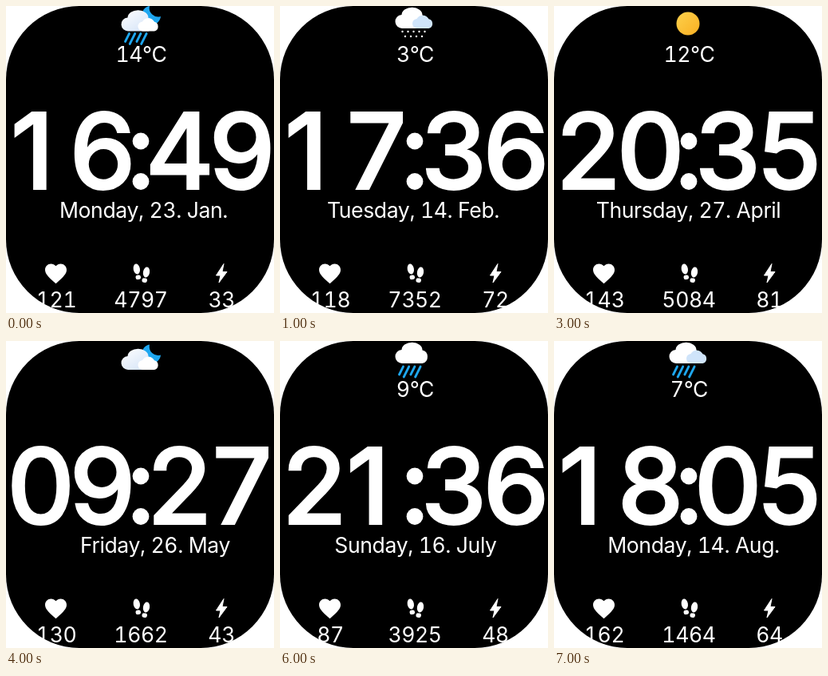
An HTML page for the animation above (8 s loop, 336 by 384 pixels).

```html
<!DOCTYPE html>
<html lang="en">
<head>
<meta charset="utf-8">
<title>Watch face</title>
<style>
html, body { margin: 0; width: 100%; height: 100%; overflow: hidden; background: #fff; }
svg { display: block; width: 336px; height: 384px; }
text { font: 26.6px Inter, sans-serif; font-variant-numeric: tabular-nums; letter-spacing: -.4px; fill: #fff; text-anchor: middle; }
.time text { font: 500 132px Inter, sans-serif; letter-spacing: 0; text-anchor: start; stroke: #fff; stroke-width: 2; }
.face { visibility: hidden; animation: show 8s step-end infinite; }
@keyframes show {
  0% { visibility: visible; }
  12.5%, 100% { visibility: hidden; }
}
.rain { stroke: #1ea7f0; stroke-width: 2.8; stroke-linecap: round; }
</style>
</head>
<body>
<svg viewBox="0 0 336 384">
  <defs>
    <linearGradient id="gold" x2="1" y2="1">
      <stop offset="0" stop-color="#fdd14c"/><stop offset="1" stop-color="#f9af22"/>
    </linearGradient>
    <linearGradient id="mist" x2="1" y2="1">
      <stop offset="0" stop-color="#fff"/><stop offset="1" stop-color="#cfe0f6"/>
    </linearGradient>
    <path id="big" d="M153.500 28A8.500 8.500 0 0 1 152.500 11A13 9.500 0 0 1 178.500 11.500A8.500 8.500 0 0 1 178.500 28Z"/>
    <path id="small" d="M172.500 28A6 6 0 0 1 171.500 16A8.500 8.500 0 0 1 186.500 16.300A6 6 0 0 1 186.500 28Z"/>
    <g id="day"><use href="#big" fill="#fff"/><use href="#small" fill="#cfe4fa"/></g>
    <g id="night">
      <path fill="#1ea7f0" d="M180 0A12 12 0 1 0 194 13A11 11 0 0 1 180 0Z"/>
      <use href="#big" fill="url(#mist)" transform="translate(0 3.500)"/>
      <use href="#small" fill="#fff" transform="translate(-.5 3.500)"/>
    </g>
  </defs>

  <rect width="336" height="384" rx="92" fill="#000"/>

  <g fill="#fff">
    <circle cx="169" cy="169" r="10.400"/>
    <circle cx="169" cy="219.500" r="10.400"/>
    <path transform="translate(46.300 318.500) scale(1.350)" d="M12 21.350l-1.450-1.320C5.400 15.360 2 12.280 2 8.500 2 5.420 4.420 3 7.500 3c1.740 0 3.410.81 4.500 2.090C13.090 3.810 14.760 3 16.500 3 19.580 3 22 5.420 22 8.500c0 3.780-3.400 6.860-8.550 11.540Z"/>
    <ellipse cx="163.800" cy="329" rx="4.100" ry="6.500" transform="rotate(-10 163.800 329)"/>
    <rect x="162.500" y="336.500" width="6.500" height="5.500" rx="2.700" transform="rotate(-10 166 339)"/>
    <ellipse cx="176" cy="333" rx="4.100" ry="6.500" transform="rotate(10 176 333)"/>
    <rect x="170.500" y="340.500" width="6.500" height="5.500" rx="2.700" transform="rotate(10 174 343)"/>
    <path d="M273 322.500L263.500 337H269L267 346L277 332.500H271Z" stroke="#fff" stroke-linejoin="round"/>
  </g>
  <g id="faces"></g>
</svg>

<script>
const use = (id, y = 0) => `<use href="#${id}" y="${y}"/>`;

const rain = (n, x, y) => '<g class="rain">' + Array.from({ length: n }, (_, i) => {
  const left = x + i * 7.2, len = i % 2 ? 13 : 10;
  return `<path d="M${left} ${y}l${-len * 0.5} ${len}"/>`;
}).join('') + '</g>';

const snow = () => Array.from({ length: 9 }, (_, i) => {
  const row = i < 5 ? 0 : 1;
  const x = row ? 157 + (i - 5) * 7 : 153.5 + i * 7;
  return `<circle cx="${x}" cy="${32 + row * 6}" r="1.2" fill="#fff"/>`;
}).join('');

const icons = {
  nightRain: use('night') + rain(4, 154.5, 34.5),
  snow: use('day') + snow(),
  storm: use('day') + '<path fill="url(#gold)" d="M164 25H171L168 31H173.500L160 42.500L163.500 34.500H158Z"/>',
  sun: '<circle cx="168" cy="22" r="14.500" fill="url(#gold)"/>',
  night: use('night', 4.5),
  shower: '<use href="#big" fill="#fff"/>' + rain(4, 154.5, 32),
  rain: use('day') + rain(4, 154.5, 32),
};

// icon, temperature, time, date, date centre, pulse, steps, energy
const faces = [
  ['nightRain', '14°C', '1649', 'Monday, 23. Jan.', 172.5, 121, 4797, 33],
  ['snow', '3°C', '1736', 'Tuesday, 14. Feb.', 167, 118, 7352, 72],
  ['storm', '2°C', '1548', 'Wednesday, 15. Mar.', 149.5, 93, 11218, 59],
  ['sun', '12°C', '2035', 'Thursday, 27. April', 168.5, 143, 5084, 81],
  ['night', '', '0927', 'Friday, 26. May', 187, 130, 1662, 43],
  ['snow', '2°C', '2000', 'Saturday, 24. June', 173, 111, 6628, 55],
  ['shower', '9°C', '2136', 'Sunday, 16. July', 170, 87, 3925, 48],
  ['rain', '7°C', '1805', 'Monday, 14. Aug.', 175, 162, 1464, 64],
];

const pen = document.createElement('canvas').getContext('2d');
pen.font = '500 132px Inter, sans-serif';

// Centres the ink of a digit in its cell; a one sits at the left edge.
const cell = 66, cells = [10.5, 88, 185, 263];
const digitX = (d, i) => {
  const { actualBoundingBoxLeft: l, actualBoundingBoxRight: r } = pen.measureText(d);
  return cells[i] + l + (d === '1' ? 1 : (cell - l - r) / 2);
};

const label = (x, y, s) => `<text x="${x}" y="${y}">${s}</text>`;
const clock = time => [...time].map((d, i) => label(digitX(d, i), 229, d)).join('');

document.getElementById('faces').innerHTML = faces.map(
  ([icon, temp, time, date, mid, pulse, steps, energy], i) =>
    `<g class="face" style="animation-delay:${i - faces.length}s">
      ${icons[icon]}
      ${label(169.5, 70, temp)}
      <g class="time">${clock(time)}</g>
      ${label(mid, 265, date)}
      ${label(63, 377, pulse)}${label(169, 377, steps)}${label(270, 377, energy)}
    </g>`).join('');
</script>
</body>
</html>
```
